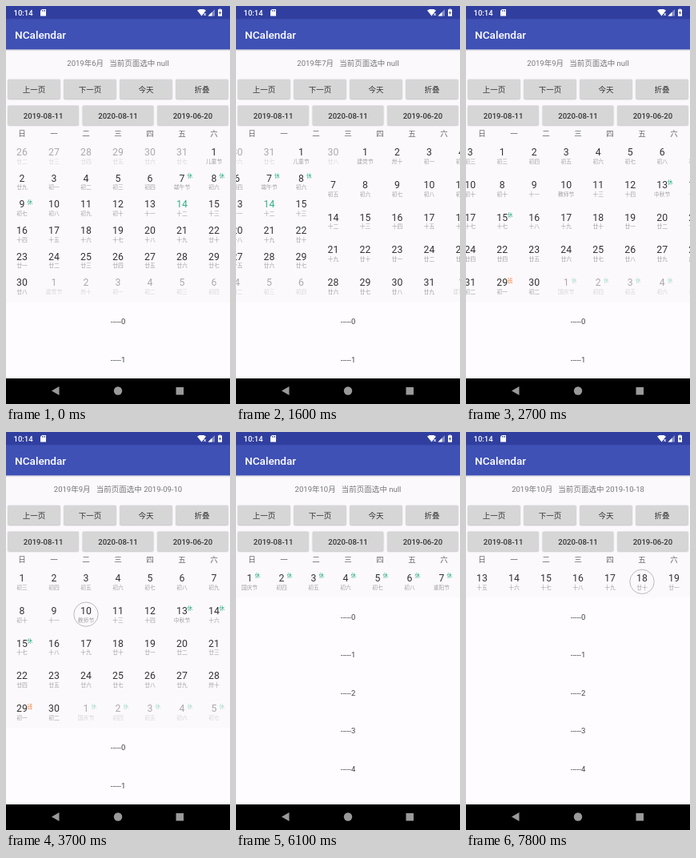
An HTML page with a canvas that plays this animation: 280x498 px, repeating every 8000 ms.

```html
<!DOCTYPE html>
<html lang="zh">
<head>
<meta charset="utf-8">
<title>NCalendar</title>
<style>
  html, body { margin: 0; width: 100%; height: 100%; overflow: hidden; background: #fcf9fd; }
  canvas { display: block; width: 280px; height: 498px; }
</style>
</head>
<body>
<canvas id="stage"></canvas>
<script>
const W = 280, H = 498, LOOP = 8000, STEP = 100, DAY = 864e5;
const PAPER = '#fcf9fd', LIST_PAPER = '#fefcff', GREEN = '#2fb184', ORANGE = '#f08030';
const FONT = 'Roboto, "Noto Sans CJK SC", "Noto Sans CJK", sans-serif';
const FIRST_ROW = 182.5, ROWS_SPAN = 163.4, LIST_OPEN = 370.5, LIST_FOLDED = 207.1;
const STATUS_END = 16.3, APP_BAR_END = 54.4, NAV_TOP = 466;

const canvas = document.getElementById('stage');
const ctx = canvas.getContext('2d');
const ratio = window.devicePixelRatio || 1;
canvas.width = W * ratio;
canvas.height = H * ratio;

// Easing and timelines
const linear = p => p;
const easeIn = p => p * p;
const easeOut = p => 1 - (1 - p) ** 2;
const easeOutQuint = p => 1 - (1 - p) ** 5;
const smooth = p => p * p * (3 - 2 * p);

// Segments: [start, end, from, to, ease]
const monthTrack = [
  [0, 400, 5, 5, linear],
  [400, 1200, 5, 5.079, easeIn],
  [1200, 1900, 5.079, 6, smooth],
  [2200, 2400, 6.996, 7, linear],
  [2700, 2800, 7.91, 8, linear],
  [4600, 5135, 8, 9, easeOutQuint]
];
const foldTrack = [[0, 5200, 0, 0, linear], [5200, 5700, 0, 1, smooth]];
const weekTrack = [
  [0, 6000, 0, 0, linear],
  [6000, 6620, 0, 1, easeOut],
  [6620, 7050, 1, 2, easeOut]
];
// Selections: [start, end, month, day]
const selections = [
  [3700, 4100, 8, 10], [4100, 4400, 8, 11], [4400, 5200, 8, 18],
  [7400, 7800, 9, 17], [7800, 8000, 9, 18]
];

function valueAt(track, t) {
  const [start, end, from, to, ease] = track.filter(s => s[0] <= t).pop();
  return from + (to - from) * ease(Math.min(1, (t - start) / (end - start)));
}

// Calendar data, months counted from 0
const date = (month, day) => new Date(2019, month, day);
const lunarStarts = [[4, 5], [5, 3], [6, 3], [7, 1], [7, 30], [8, 29], [9, 28]].map(s => date(...s));
const festivals = {
  '6-1': '儿童节', '6-7': '端午节', '7-1': '建党节', '8-1': '建军节', '8-7': '七夕节',
  '9-10': '教师节', '9-13': '中秋节', '10-1': '国庆节', '10-7': '重阳节',
  '10-8': '寒露', '10-24': '霜降'
};
const holidays = { 6: [7, 9], 9: [13, 15], 10: [1, 7] };
const workdays = ['9-29', '10-12'];

function lunarText(d) {
  const start = lunarStarts.filter(s => s <= d).pop();
  const n = Math.round((d - start) / DAY) + 1;
  const prefix = n === 10 ? '初' : '初十廿卅'[Math.floor(n / 10)];
  return prefix + '十一二三四五六七八九'[n % 10];
}

// Drawing helpers
function text(str, x, y, size, color, align = 'center', weight = 400) {
  ctx.font = `${weight} ${size}px ${FONT}`;
  ctx.textAlign = align;
  ctx.fillStyle = color;
  ctx.fillText(str, x, y + size * 0.36);
}

function rect(x, y, w, h, color) {
  ctx.fillStyle = color;
  ctx.fillRect(x, y, w, h);
}

function shape(points, color) {
  ctx.fillStyle = color;
  ctx.beginPath();
  points.forEach(p => ctx.lineTo(...p));
  ctx.closePath();
  ctx.fill();
}

function disc(x, y, r, color) {
  ctx.fillStyle = color;
  ctx.beginPath();
  ctx.arc(x, y, r, 0, 7);
  ctx.fill();
}

function button(label, x, y, w, weight) {
  const h = 24.8;
  ctx.save();
  ctx.shadowColor = 'rgba(0,0,0,.25)';
  ctx.shadowBlur = 1.5 * ratio;
  ctx.shadowOffsetY = 0.5 * ratio;
  ctx.fillStyle = '#d6d6d7';
  ctx.beginPath();
  ctx.roundRect(x, y, w, h, 1.4);
  ctx.fill();
  ctx.restore();
  text(label, x + w / 2, y + h / 2 + 0.3, 9.53, '#333', 'center', weight);
}

function drawDay(d, x, y, faded, selected) {
  if (x < -30 || x > W + 30) return;
  const month = d.getMonth() + 1, day = d.getDate(), key = month + '-' + day;
  const [from, to] = holidays[month] || [99, 0];
  ctx.globalAlpha = faded ? 0.4 : 1;
  text(day, x, y, 12.25, key === '6-14' ? GREEN : '#333');
  text(festivals[key] || lunarText(d), x, y + 11.8, 6.8, '#a0a0a0');
  if (day >= from && day <= to) text('休', x + 10, y - 2.5, 6.8, GREEN);
  if (workdays.includes(key)) text('班', x + 10, y - 2.5, 6.8, ORANGE);
  ctx.globalAlpha = 1;
  if (selected) {
    ctx.strokeStyle = '#aaa';
    ctx.lineWidth = 0.8;
    ctx.beginPath();
    ctx.arc(x, y + 4.8, 15.2, 0, 7);
    ctx.stroke();
  }
}

const isSelected = (d, sel) => !!sel && d.getMonth() === sel[2] && d.getDate() === sel[3];

function drawMonth(month, left, sel) {
  const lead = date(month, 1).getDay();
  const rows = Math.ceil((lead + date(month + 1, 0).getDate()) / 7);
  for (let i = 0; i < rows * 7; i++) {
    const d = date(month, 1 - lead + i);
    const outside = d.getMonth() !== month;
    const y = FIRST_ROW + Math.floor(i / 7) * ROWS_SPAN / (rows - 1);
    drawDay(d, left + 20 + i % 7 * 40, y, outside, !outside && isSelected(d, sel));
  }
}

function drawWeeks(position, sel) {
  for (let i = 0; i < 21; i++) {
    const d = date(8, 29 + i);
    drawDay(d, 20 + i * 40 - position * W, FIRST_ROW, false, isSelected(d, sel));
  }
}

function drawBars() {
  const shadow = ctx.createLinearGradient(0, APP_BAR_END, 0, APP_BAR_END + 2.5);
  shadow.addColorStop(0, 'rgba(0,0,0,.16)');
  shadow.addColorStop(1, 'rgba(0,0,0,0)');
  rect(0, APP_BAR_END, W, 2.5, shadow);
  rect(0, 0, W, APP_BAR_END, '#3f51b5');
  rect(0, 0, W, STATUS_END, '#303f9f');
  text('NCalendar', 11, 36, 13.62, '#fff', 'left', 500);

  text('10:14', 9.5, 8.5, 9.5, '#fff', 'left', 500);
  shape([[45, 4], [50, 4], [50, 12.5], [43, 12.5], [43, 6]], '#fff');
  for (let i = 0; i < 3; i++) rect(45.2 + i * 1.5, 5, 0.8, 1.8, '#303f9f');
  shape([[239, 5.5], [242, 4], [247, 4], [250, 5.5], [244.5, 12.5]], '#fff');
  text('x', 248.5, 10, 6, '#fff', 'center', 700);
  shape([[261, 4], [261, 12.5], [252.5, 12.5]], 'rgba(255,255,255,.4)');
  shape([[257.5, 7.5], [257.5, 12.5], [252.5, 12.5]], '#fff');
  rect(266.5, 3.5, 2, 1, '#fff');
  rect(265, 4.3, 5, 8.4, '#fff');
  shape([[267.9, 5.5], [266, 9], [267.3, 9], [267.1, 11.5], [269, 8], [267.7, 8]], '#303f9f');

  rect(0, NAV_TOP, W, H - NAV_TOP, '#000');
  shape([[57, 481.5], [66.5, 476], [66.5, 487]], '#9a9a9a');
  disc(140, 481.5, 5.2, '#9a9a9a');
  rect(212.5, 477, 9.5, 9.5, '#9a9a9a');
}

function drawList(top) {
  rect(0, top, W, NAV_TOP - top, LIST_PAPER);
  for (let i = 0; i < 6; i++) text('-----' + i, 140, top + 24 + i * 47.65, 9.53, '#444');
}

function draw(t) {
  const position = valueAt(monthTrack, t);
  const week = valueAt(weekTrack, t);
  const fold = valueAt(foldTrack, t);
  const month = Math.round(position);
  const sel = selections.find(s => t >= s[0] && t < s[1]);

  ctx.setTransform(ratio, 0, 0, ratio, 0, 0);
  rect(0, 0, W, H, PAPER);

  if (week > 0) {
    drawWeeks(week, sel);
  } else {
    const page = Math.floor(position);
    drawMonth(page, (page - position) * W, sel);
    if (position > page) drawMonth(page + 1, (page + 1 - position) * W, sel);
  }
  drawList(LIST_OPEN + (LIST_FOLDED - LIST_OPEN) * fold);

  const pad = n => String(n).padStart(2, '0');
  const picked = sel && sel[2] === month ? `2019-${pad(month + 1)}-${pad(sel[3])}` : 'null';
  text(`2019年${month + 1}月   当前页面选中 ${picked}`, 140, 72, 9.53, '#777');
  ['上一页', '下一页', '今天', '折叠'].forEach((s, i) => button(s, 2.3 + i * 70, 91.7, 65.4, 400));
  ['2019-08-11', '2020-08-11', '2019-06-20'].forEach((s, i) => button(s, 2.3 + i * 93.4, 124.4, 88.6, 500));
  [...'日一二三四五六'].forEach((s, i) => text(s, 20 + i * 40, 160, 9.53, '#666'));
  drawBars();
}

// The screen refreshes ten times a second
const begin = performance.now();
function tick() {
  const t = (performance.now() - begin) % LOOP;
  draw(Math.floor(t / STEP) * STEP);
  requestAnimationFrame(tick);
}
tick();
</script>
</body>
</html>
```
